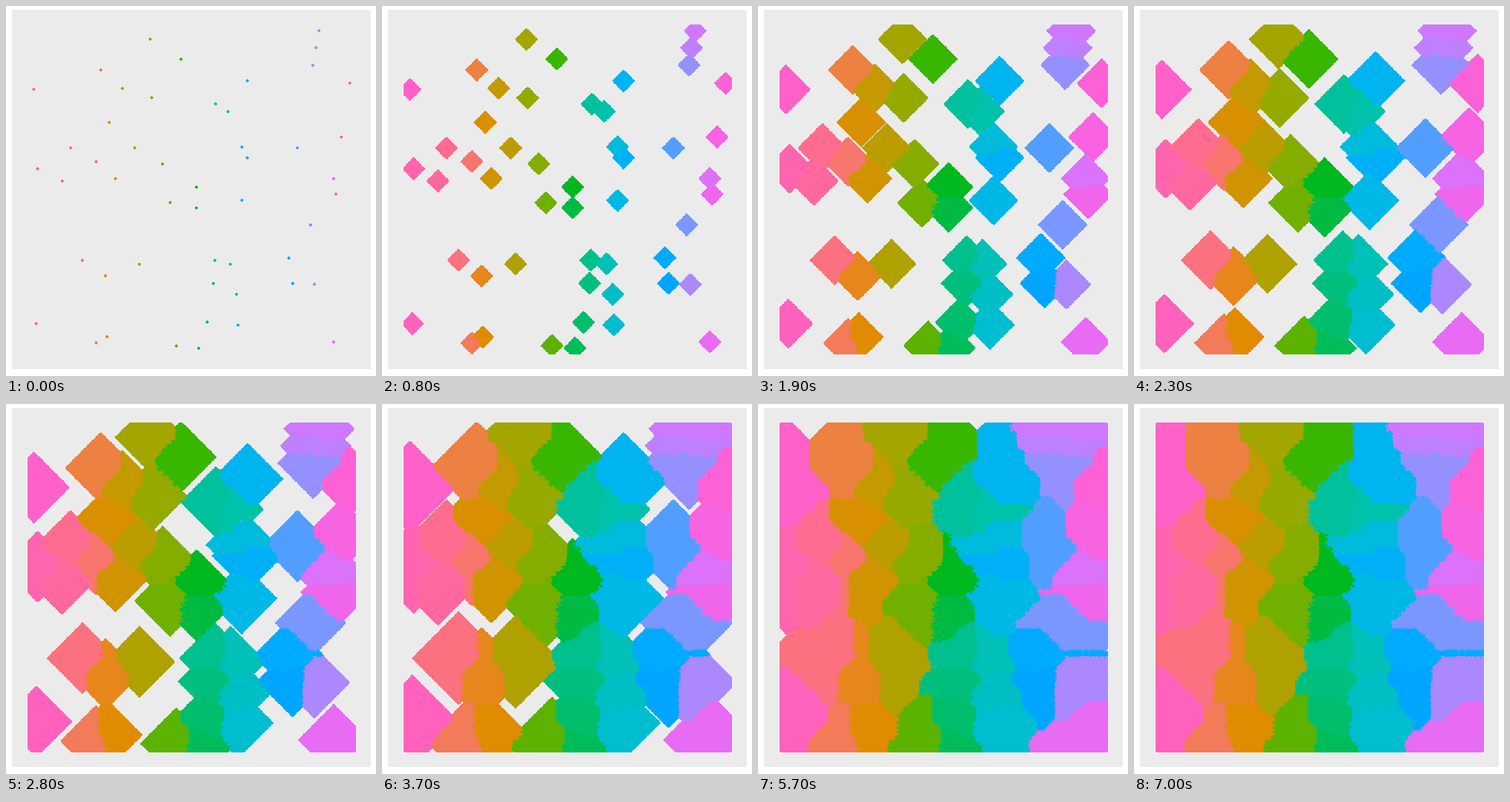
A matplotlib script that plays this animation: 480x480 px, repeating every 8.7 s.

```python
import numpy as np
import matplotlib.pyplot as plt
from matplotlib.animation import FuncAnimation

SIZE = 480
CELLS = 269                      # lattice nodes per side
LEFT, RIGHT, TOP, BOTTOM = 30, 452, 26, 450
LAST_STEP = 70
FRAMES = 87

# The only data: one point per region, from left to right.
# Regions, seams, colours and growth all follow from these.
SEEDS = np.array([
    (36, 108), (39, 412), (41, 211), (73, 227), (84, 185),
    (100, 330), (116, 202), (117, 437), (123, 83), (129, 350),
    (131, 429), (134, 151), (142, 224), (152, 106), (167, 185),
    (173, 335), (187, 43), (189, 120), (203, 204), (212, 256),
    (220, 441), (227, 68), (247, 235), (247, 261), (251, 444),
    (262, 410), (270, 360), (271, 330), (272, 128), (288, 137),
    (292, 334), (300, 374), (301, 414), (306, 183), (306, 253),
    (313, 97), (314, 197), (367, 326), (371, 360), (378, 185),
    (395, 284), (399, 76), (400, 361), (401, 54), (407, 33),
    (426, 223), (426, 436), (429, 245), (434, 170), (446, 101),
])


def hcl_to_rgb(hue, chroma=100, light=65):
    """Polar CIE-LUV to 8-bit sRGB."""
    angle = np.radians(hue)
    u = chroma * np.cos(angle) / (13 * light) + 0.1978
    v = chroma * np.sin(angle) / (13 * light) + 0.4683
    y = ((light + 16) / 116) ** 3
    x = 9 * y * u / (4 * v)
    z = y * (12 - 3 * u - 20 * v) / (4 * v)
    linear = np.array([3.2405 * x - 1.5372 * y - 0.4985 * z,
                       -0.9693 * x + 1.8760 * y + 0.0416 * z,
                       0.0556 * x - 0.2040 * y + 1.0572 * z])
    linear = np.clip(linear, 0, 1)
    srgb = np.where(linear > 0.00304,
                    1.055 * linear ** (1 / 2.4) - 0.055, 12.92 * linear)
    return np.round(255 * srgb, 0).astype(np.uint8).T


def grow_regions(rng):
    """Owner and birth step of every lattice cell, by Manhattan distance."""
    step = np.array([RIGHT - LEFT, BOTTOM - TOP]) / (CELLS - 1)
    nodes = np.rint((SEEDS - (LEFT, TOP)) / step).astype(int)
    axis = np.arange(CELLS)
    dx = np.abs(axis - nodes[:, :1])
    dy = np.abs(axis - nodes[:, 1:])
    dist = dx[:, :, None] + dy[:, None, :]
    # Noise below one unit settles ties at random.
    owner = np.argmin(dist + 0.9 * rng.random(dist.shape), axis=0)
    birth = np.minimum(dist.min(axis=0), LAST_STEP)
    return owner.ravel(), birth.ravel()


rng = np.random.default_rng(7)
owner, birth = grow_regions(rng)

cols = np.rint(np.linspace(LEFT, RIGHT, CELLS)).astype(int)
rows = np.rint(np.linspace(TOP, BOTTOM, CELLS)).astype(int)
cell_x = np.repeat(cols, CELLS)
cell_y = np.tile(rows, CELLS)

# Younger cells lie on top; cells of one step are stacked at random.
order = np.argsort(birth + 0.9 * rng.random(birth.size))
owner, birth, cell_x, cell_y = (a[order] for a in (owner, birth, cell_x, cell_y))

# One turn of the hue circle, from left to right.
hues = 331.8 + np.arange(len(SEEDS)) * 360 / len(SEEDS)
cell_color = hcl_to_rgb(hues)[owner]

# Round dot, four pixels wide.
DOT = [(i, j) for i in range(-2, 2) for j in range(-2, 2)
       if np.hypot(i + 0.5, j + 0.5) < 2]

backdrop = np.full((SIZE, SIZE, 3), 255, np.uint8)
backdrop[5:471, 8:473] = 235


def paint(step):
    alive = np.flatnonzero(birth <= step)
    x, y = cell_x[alive], cell_y[alive]
    top = np.full((SIZE, SIZE), -1)
    for i, j in DOT:
        top[y + j, x + i] = np.maximum(top[y + j, x + i], alive)
    picture = backdrop.copy()
    covered = top >= 0
    picture[covered] = cell_color[top[covered]]
    return picture


fig = plt.figure(figsize=(4.8, 4.8), dpi=100)
ax = fig.add_axes([0, 0, 1, 1])
ax.axis("off")
image = ax.imshow(paint(0), interpolation="nearest", aspect="auto")


def update(frame):
    image.set_data(paint(min(frame, LAST_STEP)))
    return [image]


anim = FuncAnimation(fig, update, frames=FRAMES, interval=100,
                     repeat=True, repeat_delay=0)
plt.show()
```
